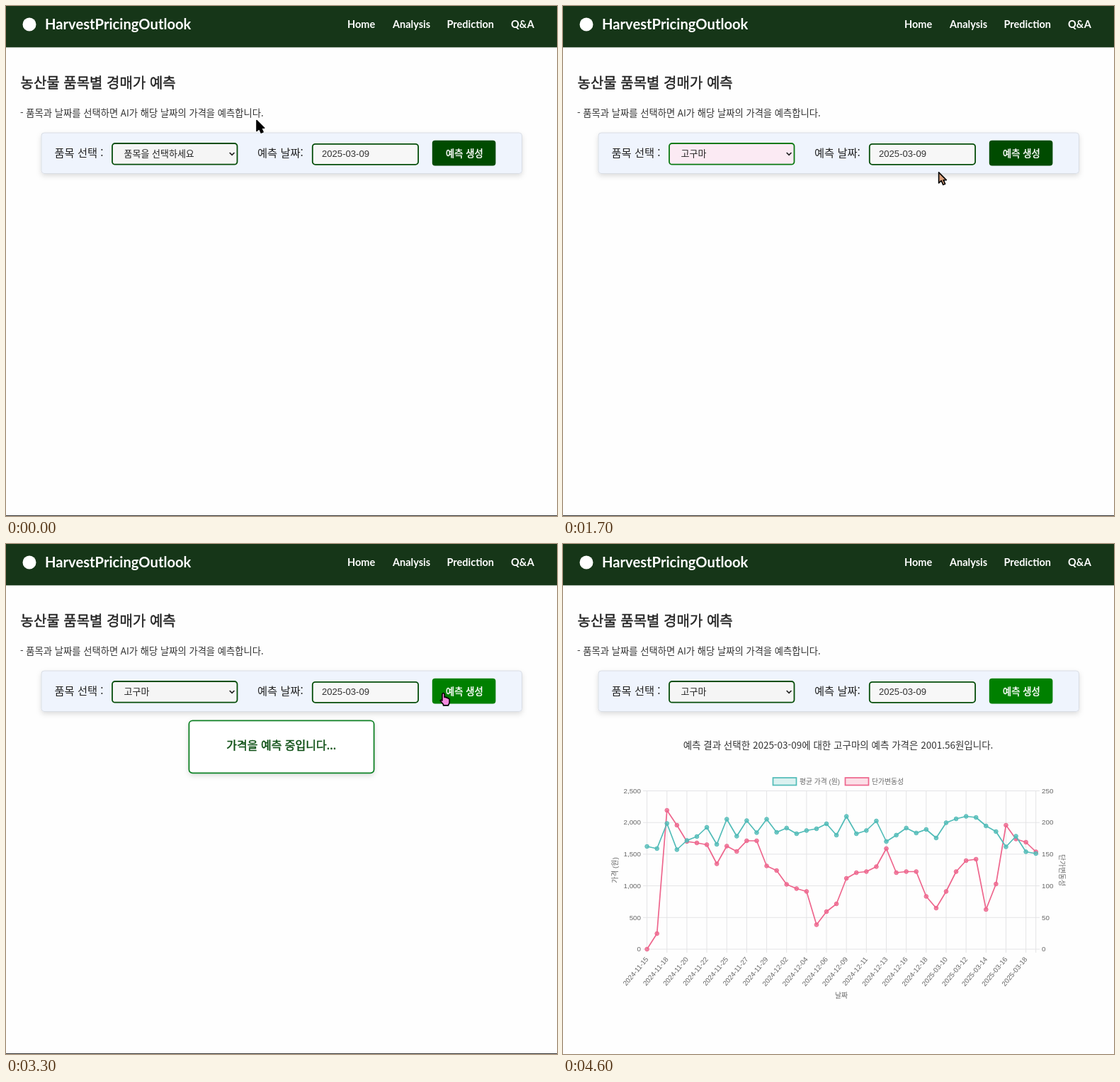
Recreate the animation shown at these times as an HTML page. Size 778 px wide and 720 px high, loop 4700 ms.

```html
<!DOCTYPE html>
<html lang="ko">
<head>
<meta charset="utf-8">
<title>농산물 예측</title>
<style>
  html, body { margin: 0; width: 100%; height: 100%; overflow: hidden; background: #fefefe; }
  svg { display: block; font-family: "Noto Sans CJK KR", "Noto Sans CJK", "Noto Sans", sans-serif; }
  .lato { font-family: Lato, sans-serif; font-weight: 700; fill: #fff; }
  .arial { font-family: "Liberation Sans", "Noto Sans CJK KR", sans-serif; }
  .medium { fill: currentColor; stroke: currentColor; stroke-width: .45; }
  #chart { font-family: "Liberation Sans", "Noto Sans CJK KR", sans-serif; font-size: 9.8px; fill: #666; }
</style>
</head>
<body>
<svg id="stage" width="778" height="720" viewBox="0 0 778 720">
  <defs>
    <filter id="shadow" x="-20%" y="-30%" width="140%" height="170%">
      <feDropShadow dx="0" dy="3" stdDeviation="3.5" flood-opacity=".13"/>
    </filter>
  </defs>
  <rect width="778" height="720" fill="#fefefe"/>
  <rect width="778" height="58.4" fill="#163618"/>
  <circle cx="33" cy="26" r="9.5" fill="#fff"/>
  <g class="lato" font-size="14.5">
    <text x="55" y="32.5" font-size="20.2">HarvestPricingOutlook</text>
    <text x="482" y="31">Home</text>
    <text x="546" y="31">Analysis</text>
    <text x="622.5" y="31">Prediction</text>
    <text x="713" y="31">Q&amp;A</text>
  </g>
  <text x="20.5" y="116.3" font-size="20" class="medium" color="#222">농산물 품목별 경매가 예측</text>
  <text x="20" y="155.8" font-size="13.3" fill="#333">- 품목과 날짜를 선택하면 AI가 해당 날짜의 가격을 예측합니다.</text>

  <rect x="50" y="179" width="678.5" height="57.5" rx="4" fill="#eff4fd" stroke="#d9dde4" filter="url(#shadow)"/>
  <g fill="#222" font-size="15.3">
    <text x="68.5" y="213.3">품목 선택 :</text>
    <text x="355" y="213.3">예측 날짜:</text>
  </g>
  <rect id="select" x="150" y="194" width="176.5" height="29.7" rx="4" stroke-width="1.8"/>
  <text id="selected" x="166.5" y="213.4" font-size="13" fill="#222"></text>
  <path d="M315.7 207l3.4 3.4 3.4-3.4" fill="none" stroke="#222" stroke-width="1.7"/>
  <rect x="432.8" y="194.8" width="149.3" height="29" rx="4" fill="#f7f7f7" stroke="#064e0a" stroke-width="1.8"/>
  <text x="446" y="213" font-size="13.1" class="arial" fill="#333">2025-03-09</text>
  <rect id="button" x="601.8" y="189.8" width="89.6" height="35.8" rx="4"/>
  <text x="621" y="213.2" font-size="13.3" class="medium" color="#fff">예측 생성</text>

  <g id="loading">
    <rect x="258.4" y="249.3" width="261.2" height="74" rx="5" fill="#fff" stroke="#118126" stroke-width="1.8" filter="url(#shadow)"/>
    <text x="388.7" y="290.4" font-size="16" class="medium" text-anchor="middle" color="#0d4f14">가격을 예측 중입니다...</text>
  </g>
  <g id="result">
    <text x="388.5" y="289" font-size="13.5" text-anchor="middle" fill="#333">예측 결과 선택한 2025-03-09에 대한 고구마의 예측 가격은 2001.56원입니다.</text>
    <g id="chart"></g>
  </g>
  <path id="footer" d="M0 719.5H778" stroke="#333"/>
  <g id="menu"></g>
  <path id="cursor" stroke="#000" stroke-width="1.6" stroke-linejoin="round"/>
</svg>
<script>
const LOOP = 4700, STEP = 100;
const OPEN = 300, MENU_MOVE = 700, PICK = 1400, HOVER = 1800, CLICK = 2000;
const CHART = 3450, GROW = 470, LEAVE = 4500;

const $ = id => document.getElementById(id);
const set = (node, attrs) => {
  for (const key in attrs) node.setAttribute(key, attrs[key]);
  return node;
};
const add = (parent, tag, attrs, text = "") => {
  const node = set(document.createElementNS("http://www.w3.org/2000/svg", tag), attrs);
  node.textContent = text;
  return parent.appendChild(node);
};
const show = (id, on) => set($(id), { visibility: on ? "visible" : "hidden" });

// Drop-down list
const PROMPT = "품목을 선택하세요";
const items = [PROMPT, ..."감귤 감자 고구마 단감 당근 대파 딸기 마늘 무 바나나 방울토마토 배 배추 복숭아 부추 사과 상추 새송이".split(" ")];
const ROW = 26, LIST_TOP = 225.5;
const menu = $("menu");
add(menu, "rect", { x: 149.5, y: 225, width: 178, height: 510, fill: "#fff", stroke: "#777", filter: "url(#shadow)" });
add(menu, "rect", { x: 150, y: LIST_TOP, width: 164.5, height: 500, fill: "#faebf4" });
add(menu, "rect", { x: 317, y: 240, width: 7, height: 296, rx: 3.5, fill: "#8b8b8b" });
add(menu, "path", { d: "M316.5 235l4-5 4 5zM316.5 718h8v2h-8z", fill: "#777" });
const highlight = add(menu, "rect", { x: 150, width: 164.5, height: ROW });
const rows = items.map((name, i) =>
  add(menu, "text", { x: 166.5, y: 243.8 + i * ROW, "font-size": 13 }, name));

// Chart: point heights in pixels above the zero line
const LEFT = 118.6, RIGHT = 667.7, TOP = 348.5, BASE = 572;
const priceHeights = [145, 142, 177.5, 140.5, 153.5, 159, 172, 148, 183.5, 159.5,
  181.5, 164.5, 183.5, 165, 171, 163, 167.5, 170, 177, 161,
  187.5, 163, 167.5, 181, 152, 161, 171, 164, 169, 157,
  178.5, 184, 187.5, 186, 174, 166, 144.5, 159.5, 137.5, 135];
const changeHeights = [0, 22, 196, 175, 152, 150, 147.5, 120.5, 145.5, 138,
  153, 153, 117.5, 111, 91.5, 85.5, 81.5, 34.5, 53, 64,
  100, 108, 109.5, 116.5, 142, 108, 109.5, 109.5, 74.5, 58,
  81.5, 109.5, 125, 127, 56, 92, 175, 155.5, 151, 137.5];
const dates = [
  ..."11-15 11-18 11-20 11-22 11-25 11-27 11-29 12-02 12-04 12-06 12-09 12-11 12-13 12-16 12-18".split(" ").map(d => "2024-" + d),
  ...[10, 12, 14, 16, 18].map(d => "2025-03-" + d)];
const TEAL = "#52bcb8", PINK = "#ee668d";
const chart = $("chart");
const pointX = i => LEFT + i * (RIGHT - LEFT) / (priceHeights.length - 1);
const gridLine = d => add(chart, "path", { d, stroke: "#e4e4e6", fill: "none" });

for (let i = 0; i <= 5; i++) {
  const y = BASE - i * (BASE - TOP) / 5;
  gridLine(`M113 ${y}H673`);
  add(chart, "text", { x: 110, y: y + 3.2, "text-anchor": "end" }, (i * 500).toLocaleString("en-US"));
  add(chart, "text", { x: 676, y: y + 3.2 }, i * 50);
}
dates.forEach((date, i) => {
  const x = pointX(i * 2);
  gridLine(`M${x} ${TOP}V577`);
  add(chart, "text", { "text-anchor": "end", transform: `translate(${x + 2.5} 586.5) rotate(-50)` }, date);
});
gridLine(`M${RIGHT} ${TOP}V577`);
const legend = (x, color, name) => {
  add(chart, "rect", { x, y: 330, width: 33, height: 10.5, fill: color, "fill-opacity": .2, stroke: color, "stroke-width": 1.7 });
  add(chart, "text", { x: x + 37.5, y: 338.5 }, name);
};
legend(296.5, TEAL, "평균 가격 (원)");
legend(398.5, PINK, "단가변동성");
const axisTitle = (x, y, angle, name) =>
  add(chart, "text", { y: 3.5, "text-anchor": "middle", transform: `translate(${x} ${y}) rotate(${angle})` }, name);
axisTitle(73, 460.5, -90, "가격 (원)");
axisTitle(704.5, 460.5, 90, "단가변동성");
axisTitle(393, 637, 0, "날짜");

const makeSeries = (heights, color) => ({
  heights,
  line: add(chart, "path", { fill: "none", stroke: color, "stroke-width": 1.7, "stroke-linejoin": "round" }),
  dots: heights.map((_, i) => add(chart, "circle", {
    cx: pointX(i), r: 2.8, fill: color, "fill-opacity": .75, stroke: color }))
});
const series = [makeSeries(changeHeights, PINK), makeSeries(priceHeights, TEAL)];

function drawSeries({ heights, line, dots }, growth) {
  const ys = heights.map(h => BASE - h * growth);
  set(line, { d: "M" + ys.map((y, i) => `${pointX(i)} ${y}`).join("L") });
  dots.forEach((dot, i) => set(dot, { cy: ys[i] }));
}

// Pointer
const ARROW = "M0 0V15l3.6-3.3 2.6 5.8 2.8-1.2-2.5-5.5h4.2z";
const HAND = "M-1.6 1.5q1.6-3 3.2 0V6q2-1 2.8.6 1.8-.6 2.4 1 1.8-.3 1.8 1.8V13q0 2-1.4 3.4v1H0V16l-4.3-5.2q.5-2 2.7-.3z";
const track = [[0, 354, 161.5], [300, 319.5, 205.5], [600, 319.5, 205.5], [800, 306, 245],
  [1100, 269.8, 308], [1400, 269.8, 308], [1800, 617.5, 210.5],
  [4200, 617.5, 210.5], [4500, 640, -20]];

function pointerAt(t) {
  const next = track.findIndex(key => key[0] > t);
  if (next < 0) return track.at(-1).slice(1);
  const [t0, x0, y0] = track[next - 1], [t1, x1, y1] = track[next];
  const k = (t - t0) / (t1 - t0);
  return [x0 + (x1 - x0) * k, y0 + (y1 - y0) * k];
}

function drawPointer(t, x, y) {
  const onSelect = t >= OPEN && t < MENU_MOVE;
  const onButton = t >= HOVER && t <= 4200;
  set($("cursor"), {
    d: onSelect || onButton ? HAND : ARROW,
    fill: onButton ? "#f58be0" : t < MENU_MOVE ? "#000" : "#d9a07c",
    transform: `translate(${x} ${y})`
  });
  show("cursor", t < LEAVE);
}

function drawMenu(t, y) {
  const hovered = Math.max(0, Math.floor((y - LIST_TOP) / ROW));
  set(highlight, { y: LIST_TOP + hovered * ROW, fill: hovered ? "#1967d2" : "#c6c6c6" });
  rows.forEach((row, i) => set(row, { fill: i === hovered ? "#fff" : i ? "#222" : "#777" }));
  show("menu", t >= OPEN && t < PICK);
}

function render(t) {
  const [x, y] = pointerAt(t);
  const focused = t >= OPEN && t < CLICK;
  set($("select"), { fill: focused ? "#fbeaf3" : "#f5f5f5", stroke: focused ? "#0b7a12" : "#064e0a" });
  $("selected").textContent = t < PICK ? PROMPT : "고구마";
  set($("button"), { fill: t < HOVER ? "#004b00" : "#008000" });
  drawMenu(t, y);
  drawPointer(t, x, y);
  show("loading", t >= CLICK && t < CHART);
  show("result", t >= CHART);
  show("footer", t < CHART);
  const k = Math.min(1, Math.max(0, (t - CHART) / GROW));
  series.forEach(s => drawSeries(s, 1 - (1 - k) ** 4));
}

const start = performance.now();
function tick() {
  const t = (performance.now() - start) % LOOP;
  render(Math.floor(t / STEP) * STEP);
  requestAnimationFrame(tick);
}
tick();
</script>
</body>
</html>
```
